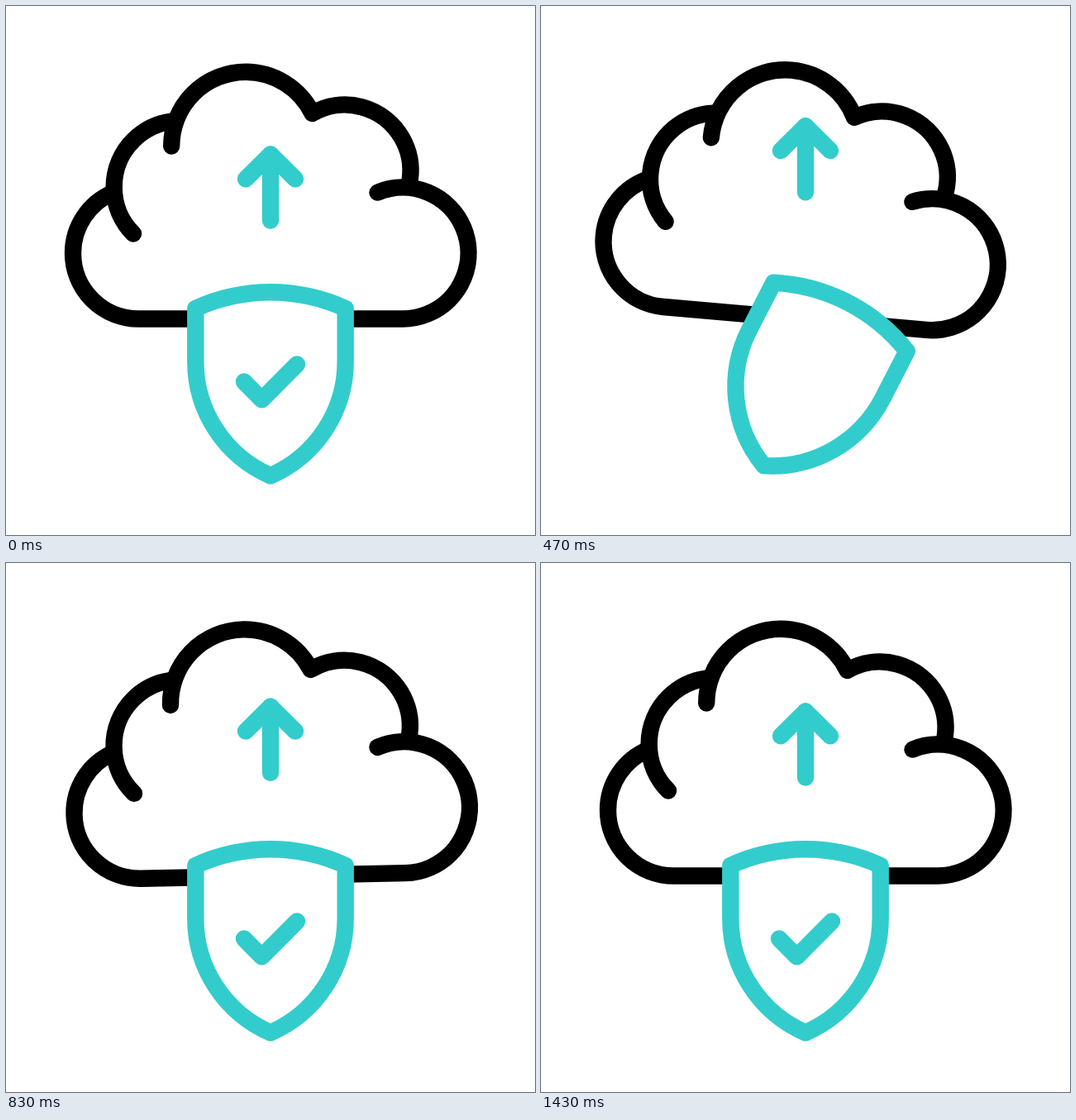
Animation, 640 px wide and 640 px high, one loop 1670 ms. Source, as an HTML page with a canvas:

```html
<!DOCTYPE html>
<html lang="en">
<head>
<meta charset="utf-8">
<title>Secure cloud upload</title>
<style>
  html, body { margin: 0; width: 100%; height: 100%; overflow: hidden; background: #fff; }
  canvas { display: block; width: 100vw; height: 100vh; object-fit: contain; }
</style>
</head>
<body>
<canvas id="stage" width="640" height="640"></canvas>
<script>
const ctx = document.getElementById('stage').getContext('2d');
const LOOP = 1670, FPS = 30, FRAMES = 50;
const BLACK = '#000', TEAL = '#33cccc';

// Smooth rise from 0 to 1 between two frames.
function ramp(frame, start, end) {
  const x = Math.min(1, Math.max(0, (frame - start) / (end - start)));
  return x * x * (3 - 2 * x);
}

// Starts at rest and eases to each level in turn, one every step frames.
function swing(frame, start, step, levels) {
  return levels.reduce((sum, level, i) => {
    const from = start + i * step;
    return sum + (level - (levels[i - 1] || 0)) * ramp(frame, from, from + step);
  }, 0);
}

const cloudTurn = frame => swing(frame, 0, 7, [-11.6, 5, -3, 0]);
const shieldTurn = frame => swing(frame, 6.7, 6.05, [31.8, -10, 0, 7, -4.2, 0]);
const checkDrawn = frame => 1 - ramp(frame, 0, 13.7) + ramp(frame, 14, 23.5);

// A long lift, three even bobs, then a shorter settle.
const arrowShift = frame => -42 * ramp(frame, 0, 12.2)
  + swing(frame, 12.2, 8.1, [61.4, 20.7, 58.3])
  - 16.3 * ramp(frame, 36.5, 43);

// Circular arc from the direction of one point to that of another.
function arcBetween(path, cx, cy, r, x1, y1, x2, y2) {
  path.arc(cx, cy, r, Math.atan2(y1 - cy, x1 - cx), Math.atan2(y2 - cy, x2 - cx));
}

function polyline(...points) {
  const path = new Path2D();
  points.forEach(([x, y]) => path.lineTo(x, y));
  return path;
}

const base = new Path2D();
arcBetween(base, 480, 299, 79.5, 449.5, 225.5, 480, 378.5);
arcBetween(base, 160.5, 299, 79.5, 160.5, 378.5, 130, 225.5);

const leftPuff = new Path2D();
arcBetween(leftPuff, 210.7, 219, 80, 154, 275.5, 200.5, 140);

const topPuffs = new Path2D();
arcBetween(topPuffs, 290, 169.5, 89.8, 200.5, 169.5, 370.5, 130);
arcBetween(topPuffs, 410, 199, 79.5, 370.5, 130, 488.5, 210);

const shield = new Path2D();
arcBetween(shield, 320, 564.9, 218.6, 229.3, 366, 410.7, 366);
arcBetween(shield, 259.9, 430, 150.8, 410.7, 430, 320, 568.3);
arcBetween(shield, 380.1, 430, 150.8, 320, 568.3, 229.3, 430);
shield.closePath();

const arrow = polyline([290, 209.3], [320, 179.5], [350, 209.3]);
const stem = polyline([320, 179.5], [320, 259.5]);
const check = [[288, 454.5], [309.5, 476.3], [352, 433.5]];

const distance = (a, b) => Math.hypot(b[0] - a[0], b[1] - a[1]);
const between = (a, b, k) => [a[0] + (b[0] - a[0]) * k, a[1] + (b[1] - a[1]) * k];

function partialCheck(part) {
  const [a, b, c] = check;
  const first = distance(a, b), second = distance(b, c);
  const length = part * (first + second);
  return length <= first
    ? polyline(a, between(a, b, length / first))
    : polyline(a, b, between(b, c, (length - first) / second));
}

function rotated(cx, cy, degrees, draw) {
  ctx.save();
  ctx.translate(cx, cy);
  ctx.rotate(degrees * Math.PI / 180);
  ctx.translate(-cx, -cy);
  draw();
  ctx.restore();
}

function render(time) {
  const frame = Math.floor((time % LOOP + 5) * FPS / 1000) % FRAMES;

  ctx.fillStyle = '#fff';
  ctx.fillRect(0, 0, 640, 640);
  ctx.lineWidth = 20.4;
  ctx.lineCap = ctx.lineJoin = 'round';

  ctx.strokeStyle = BLACK;
  rotated(320, 229, cloudTurn(frame), () => {
    [base, leftPuff, topPuffs].forEach(path => ctx.stroke(path));
  });

  ctx.strokeStyle = TEAL;
  ctx.save();
  ctx.translate(0, arrowShift(frame));
  ctx.stroke(arrow);
  ctx.stroke(stem);
  ctx.restore();

  rotated(320, 458, shieldTurn(frame), () => {
    ctx.fill(shield);
    ctx.stroke(shield);
    const part = checkDrawn(frame);
    if (part > 0.001) ctx.stroke(partialCheck(part));
  });
}

const started = performance.now();
function tick() {
  render(performance.now() - started);
  requestAnimationFrame(tick);
}
tick();
</script>
</body>
</html>
```
